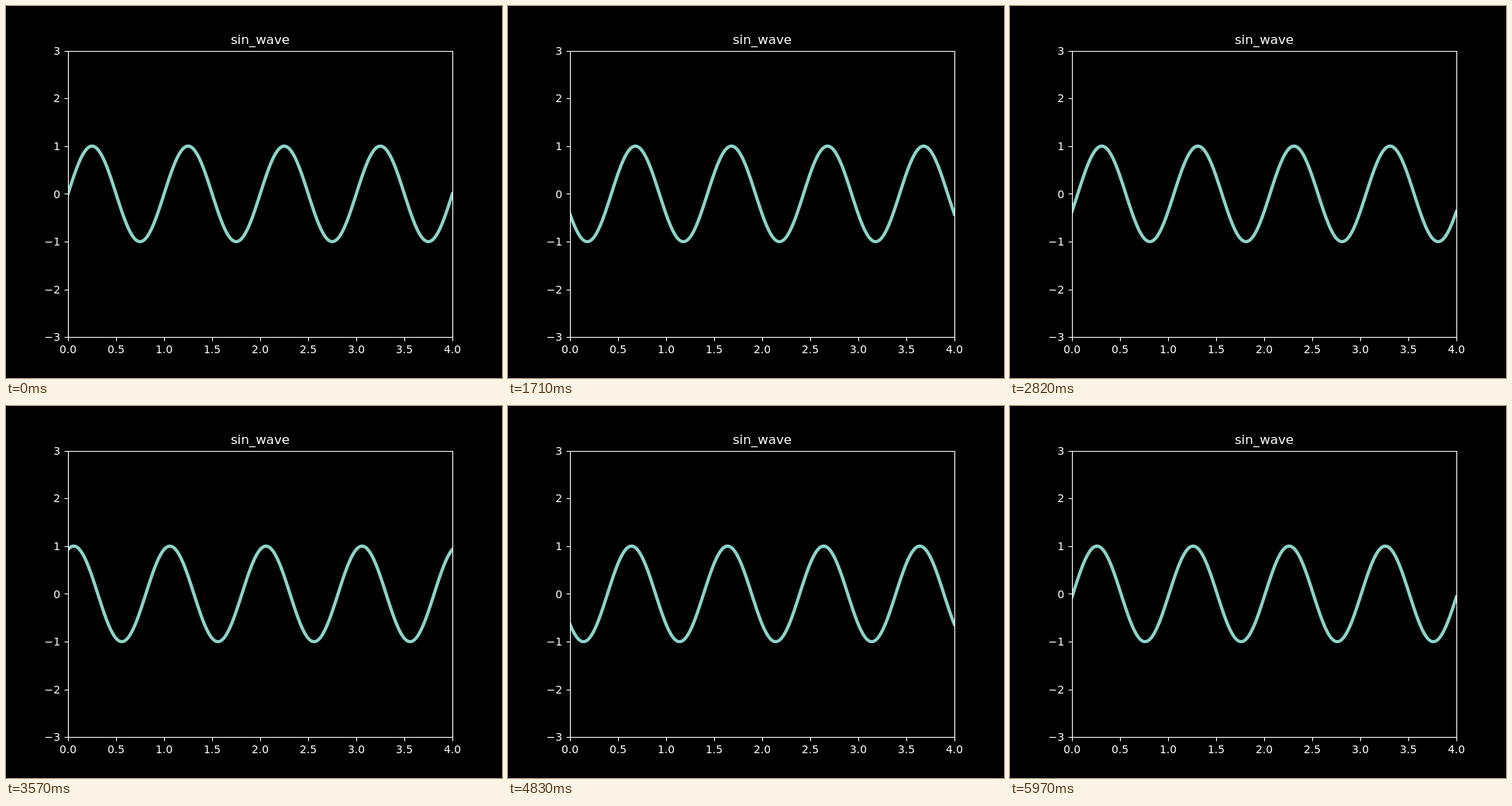
Write an HTML page with a canvas that moves like this. It is 640x480 px and loops after 6 s.

```html
<!DOCTYPE html>
<html lang="en">
<head>
<meta charset="utf-8">
<title>sin_wave</title>
<style>
  html, body { margin: 0; width: 100%; height: 100%; overflow: hidden; background: #000; }
  canvas, svg { position: absolute; left: 0; top: 0; display: block; }
  text { font: 13.889px "DejaVu Sans", sans-serif; fill: #fff; text-anchor: middle; }
  .title { font-size: 16.667px; }
  .side { text-anchor: end; }
</style>
</head>
<body>
<canvas id="plot" width="640" height="480"></canvas>
<svg id="labels" width="640" height="480">
  <text class="title" x="328" y="49">sin_wave</text>
</svg>
<script>
const ctx = document.getElementById('plot').getContext('2d');
const labels = document.getElementById('labels');

const LEFT = 80, RIGHT = 576, TOP = 57.6, BOTTOM = 427.2;
const STEP = 30, STEPS = 200;
const px = x => LEFT + x * (RIGHT - LEFT) / 4;
const py = y => (TOP + BOTTOM) / 2 - y * (BOTTOM - TOP) / 6;
const snap = v => Math.floor(v + 0.5) + 0.5;

function addLabel(text, x, y, cls) {
  const el = document.createElementNS('http://www.w3.org/2000/svg', 'text');
  el.setAttribute('x', x);
  el.setAttribute('y', y);
  if (cls) el.setAttribute('class', cls);
  el.textContent = text;
  labels.appendChild(el);
}

const axes = new Path2D();
function addLine(x0, y0, x1, y1) {
  axes.moveTo(x0, y0);
  axes.lineTo(x1, y1);
}

const box = { l: snap(LEFT), r: snap(RIGHT), t: snap(TOP), b: snap(BOTTOM) };
axes.rect(box.l, box.t, box.r - box.l, box.b - box.t);

for (let x = 0; x <= 4; x += 0.5) {
  const sx = snap(px(x));
  addLine(sx, box.b, sx, box.b + 5);
  addLabel(x.toFixed(1), px(x), 448);
}
for (let y = -3; y <= 3; y++) {
  const sy = snap(py(y));
  addLine(box.l, sy, box.l - 5, sy);
  addLabel((y < 0 ? '\u2212' : '') + Math.abs(y), 70, Math.round(py(y) + 5.2), 'side');
}

function drawWave(shift) {
  ctx.save();
  ctx.beginPath();
  ctx.rect(LEFT, 58, RIGHT - LEFT, 369);
  ctx.clip();
  ctx.beginPath();
  const n = 1000;
  for (let i = 0; i <= n; i++) {
    const x = 4 * i / n;
    ctx.lineTo(px(x), py(Math.sin(2 * Math.PI * (x + shift))));
  }
  ctx.strokeStyle = '#8dd3c7';
  ctx.lineWidth = 4.167;
  ctx.lineJoin = 'round';
  ctx.lineCap = 'square';
  ctx.stroke();
  ctx.restore();
}

function draw(time) {
  const step = Math.floor(time / STEP) % STEPS;
  ctx.fillStyle = '#000';
  ctx.fillRect(0, 0, 640, 480);
  drawWave(step / 100);
  ctx.strokeStyle = '#fff';
  ctx.lineWidth = 1.111;
  ctx.stroke(axes);
}

function tick(now) {
  draw(Math.max(0, now));
  requestAnimationFrame(tick);
}
draw(0);
requestAnimationFrame(tick);
</script>
</body>
</html>
```
